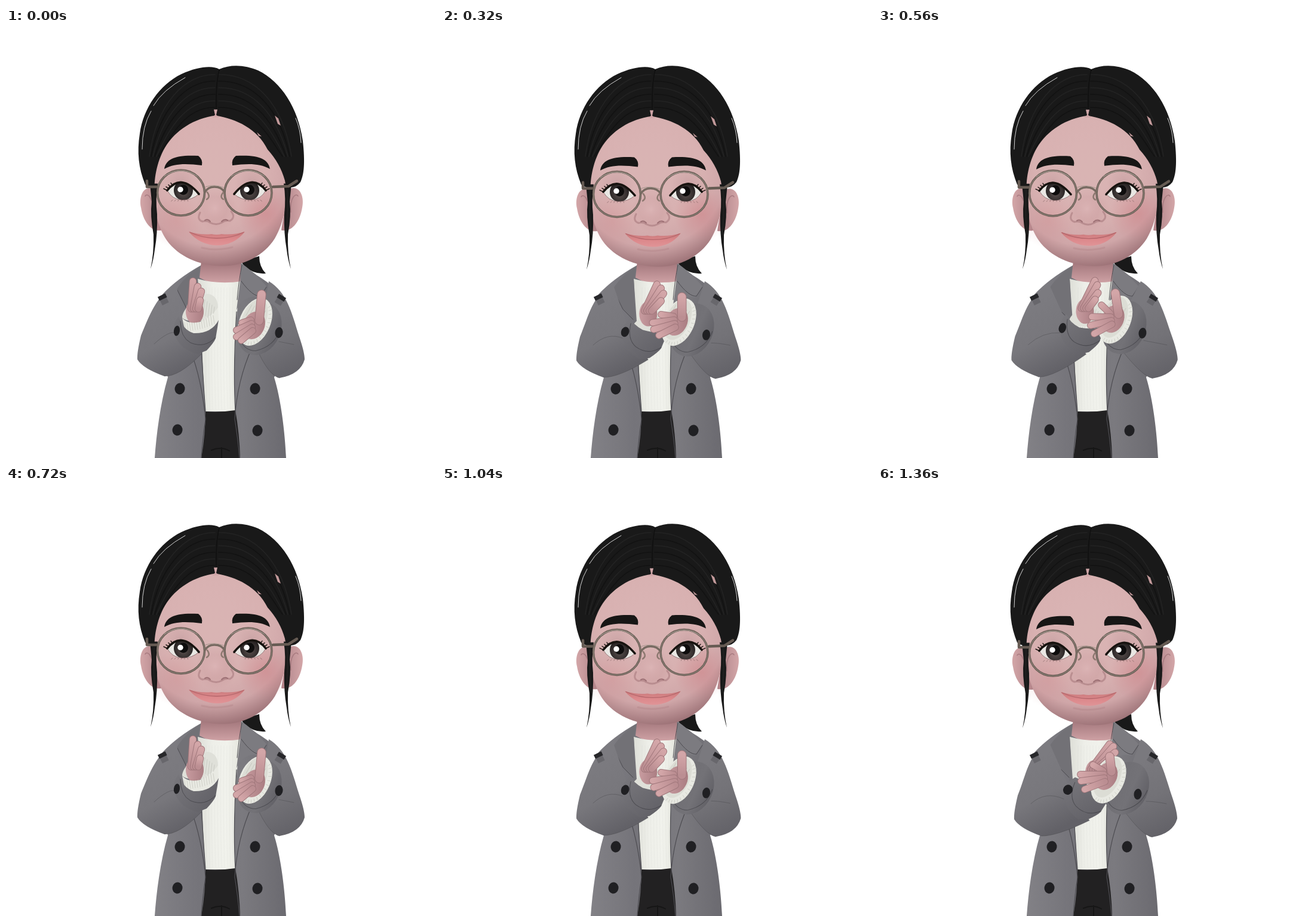
Recreate the animation shown at these times as an HTML page with a canvas. Size 720x720 px, loop 1440 ms.

```html
<!DOCTYPE html>
<html lang="en">
<head>
<meta charset="utf-8">
<title>Clapping avatar</title>
<style>
html, body { margin: 0; width: 100%; height: 100%; overflow: hidden; background: #fff; }
canvas { display: block; width: 100vw; height: 100vh; }
</style>
</head>
<body>
<canvas id="stage" width="720" height="720"></canvas>
<script>
const ctx = document.getElementById('stage').getContext('2d');
const LOOP = 1440, STEP = 80, CLAP = 360;
const BLACK = '#191919', SEAM = '#4d4c51', KNIT = '#eeefe9';

// Key poses of one clap: half open, open, closing, near, together.
const KEY_TIMES = [0, 40, 120, 160, 280];
const NOD = [[1], [0], [1], [0], [5]];
// elbow, cuff, cuff angle, palm, four fingertips
const LEFT = [
  [220, 552, 319, 513, 0, 316, 475, 313, 424, 321, 433, 327, 441, 325, 456],
  [215, 550, 282, 504, 0, 279, 470, 263, 420, 272, 425, 283, 434, 286, 445],
  [215, 550, 286, 500, -.05, 287, 463, 267, 409, 276, 411, 281, 422, 286, 440],
  [220, 552, 329, 505, 0, 329, 470, 335, 417, 339, 425, 340, 439, 337, 452],
  [228, 555, 346, 527, .4, 362, 480, 388, 432, 394, 436, 397, 446, 392, 456]
];
// elbow, cuff, cuff angle, knit centre, button, palm, thumb tip, four fingertips
const RIGHT = [
  [500, 553, 424, 503, .4, 417, 492, 457, 510, 415, 498, 428, 446, 395, 494, 386, 506, 386, 517, 394, 523],
  [501, 552, 448, 498, .5, 450, 490, 480, 507, 455, 492, 472, 448, 485, 492, 460, 508, 448, 514, 436, 524],
  [502, 553, 442, 494, .7, 440, 483, 475, 501, 447, 486, 471, 453, 458, 476, 445, 490, 432, 500, 422, 510],
  [502, 553, 415, 498, .4, 410, 486, 452, 507, 408, 488, 414, 441, 394, 466, 381, 486, 376, 501, 380, 514],
  [501, 555, 416, 506, .45, 386, 492, 435, 516, 382, 486, 388, 453, 360, 467, 339, 483, 340, 494, 346, 508]
];

const at = (list, i) => list[(i + 5) % 5];
const keyTime = i => at(KEY_TIMES, i) + CLAP * Math.floor(i / 5);

// Periodic cubic interpolation through the key poses.
function pose(keys, phase) {
  let i = 4;
  while (KEY_TIMES[i] > phase) i--;
  const [a, b, c, d] = [-1, 0, 1, 2].map(n => keyTime(i + n));
  const span = c - b, u = (phase - b) / span;
  return at(keys, i).map((p, n) => {
    const q = at(keys, i + 1)[n];
    const m = (q - at(keys, i - 1)[n]) / (c - a) * span;
    const k = (at(keys, i + 2)[n] - p) / (d - b) * span;
    return p + u * (m + u * (3 * (q - p) - 2 * m - k + u * (2 * (p - q) + m + k)));
  });
}

const fill = (d, color) => { ctx.fillStyle = color; ctx.fill(new Path2D(d)); };
function line(d, color, width = 1) {
  ctx.strokeStyle = color;
  ctx.lineWidth = width;
  ctx.stroke(new Path2D(d));
}
function oval(x, y, rx, ry, color, angle = 0) {
  ctx.beginPath();
  ctx.ellipse(x, y, rx, ry, angle, 0, 7);
  ctx.fillStyle = color;
  ctx.fill();
}
function addStops(g, colors) {
  colors.forEach((c, i) => g.addColorStop(i / (colors.length - 1), c));
  return g;
}
const linear = (x0, y0, x1, y1, ...colors) => addStops(ctx.createLinearGradient(x0, y0, x1, y1), colors);
const radial = (x, y, r, ...colors) => addStops(ctx.createRadialGradient(x, y, 0, x, y, r), colors);
const glow = (x, y, r, rgb, alpha) => oval(x, y, r, r, radial(x, y, r, `rgba(${rgb},${alpha})`, `rgba(${rgb},0)`));
function placed(x, y, angle, draw) {
  ctx.save();
  ctx.translate(x, y);
  ctx.rotate(angle);
  draw();
  ctx.restore();
}
function mirrored(axis, draw) {
  draw();
  ctx.save();
  ctx.translate(2 * axis, 0);
  ctx.scale(-1, 1);
  draw();
  ctx.restore();
}

function finger(x0, y0, x1, y1, width) {
  const d = `M${x0} ${y0}L${x1} ${y1}`;
  line(d, '#a0777b', width + 1.5);
  line(d, linear(x0, y0, x1, y1, '#bb8e92', '#d3a6a8'), width - .5);
}
const palm = (x, y, rx, ry, angle) => oval(x, y, rx, ry, linear(x - rx, y, x + rx, y, '#c89ca0', '#ab7e83'), angle);
const button = (x, y, rx = 8.5, ry = 9.5) => oval(x, y, rx, ry, '#202023', .15);

function drawBody() {
  fill('M394 391L424 382Q424 400 435 411Q415 413 398 398Z', BLACK);
  fill('M327 397Q286 420 262 446L256 520L271 585C258 630 252 680 249 720H469C467 675 460 620 449 585L484 510L470 460Q455 435 420 414L394 394Z',
    linear(249, 0, 469, 0, '#828186', '#75747a', '#7b7a7f', '#6b6a70'));
  fill('M328 380L324 418Q358 438 396 424L392 380Z', linear(0, 392, 0, 428, '#a2767b', '#d0a3a6'));
  fill('M321 420Q356 430 395 424Q386 465 384 520Q381 585 384 642H334Q329 575 328 520Z',
    linear(322, 0, 394, 0, '#dedfd8', KNIT, '#f1f2ec', '#e3e4dc'));
  for (let x = 335; x < 382; x += 5) line(`M${x} 435Q${x - 2} 540 ${x + 1} 638`, 'rgba(140,140,130,.06)');
  fill('M334 642Q358 644 384 640Q391 680 392 720H327Q334 680 334 642Z', '#222122');
  line('M344 707Q360 700 374 708M361 703V720', '#161616', 2);

  fill('M326 398Q300 415 286 437L303 471L320 490L326 520L321 420Z', '#727176');
  line('M286 437L303 471L320 488', SEAM);
  fill('M394 394Q412 406 436 432L424 451Q398 445 386 472L392 425Z', '#7c7b80');
  line('M395 397Q390 421 387 455M394 424Q413 450 426 449L436 434', SEAM);
  line('M309 540Q328 590 334 655Q329 690 327 720M412 535Q387 590 383 655Q388 685 391 720M334 642Q329 575 325 500M384 642Q380 570 386 475', SEAM, 1.2);
  button(291, 604); button(417, 604); button(287, 673); button(421, 674);
}

function shoulderTab(x, y, angle) {
  placed(x, y, angle, () => {
    ctx.fillStyle = '#68676c';
    ctx.fillRect(-6, 3, 12, 9);
    ctx.fillStyle = '#27272a';
    ctx.fillRect(-7, -4, 14, 7);
  });
}

function drawLeftArm([ex, ey, cx, cy, angle, px, py, ...tips]) {
  const tuck = 60 * Math.max(0, angle);
  fill(`M286 428C252 446 ${ex + 20} ${ey - 70} ${ex + 6} ${ey - 37}Q${ex - 1} ${ey - 8} ${ex} ${ey + 3}Q${ex + 9} ${ey + 18} ${ex + 45} ${ey + 31}
    Q${ex + 70} ${ey + 32} ${cx + 8} ${cy + 33}L${cx - 28} ${cy - 27}Z`, linear(235, 470, 292, 580, '#7c7b80', '#78777c', '#626167'));
  line(`M${ex + 28} ${ey - 23}Q${ex + 52} ${ey - 45} ${cx - 35} ${cy - 3}M${ex + 45} ${ey + 31}Q${ex + 70} ${ey + 32} ${cx + 8} ${cy + 33}`, 'rgba(60,60,65,.35)');
  shoulderTab(262, 451, -.45);
  placed(cx, cy, angle, () => {
    ctx.translate(0, tuck);
    fill('M-24-28C-15-18 20-20 36-45C36-66 20-72 8-65C-5-60-24-40-24-28Z', '#dfe0d9');
    for (let i = 0; i < 6; i++) line(`M${10 + i * 4} ${-61 + i * 3}l-3 24`, '#c5c6be', .8);
  });
  palm(px, py, 15, 21);
  for (let i = 0; i < 4; i++) finger(px - 6 + 4 * i, py - 5, tips[2 * i], tips[2 * i + 1], 11);
  placed(cx, cy, angle, () => {
    ctx.save();
    ctx.translate(0, tuck);
    fill('M-24-28C-15-14 20-16 36-45L37-24C25 0-5 2-19-4Z', '#e9eae3');
    for (let i = 0; i < 13; i++) line(`M${-20 + i * 4} ${-20 - i * i * .08}l2 14`, 'rgba(130,130,120,.25)');
    ctx.restore();
    fill(`M-30-30Q-39-18-38-8Q-37 8-22 22Q-8 31 2 33L17 27Q29 14 32 7L37-24Q25 ${-1 - tuck}-5 ${-2 - tuck}Q-22 ${-7 - tuck}-30-30Z`,
      linear(-34, -20, 25, 25, '#76757a', '#626167'));
    line('M-27-22Q-27 5-10 14Q14 24 32 5', 'rgba(50,50,55,.55)');
    button(-33, -6, 5 + 7 * Math.max(0, angle), 8.5);
  });
}

function drawRightArm([ex, ey, cx, cy, angle, wx, wy, bx, by, px, py, tx, ty, ...tips]) {
  fill(`M440 424C470 442 478 475 ${ex - 9} ${ey - 36}Q${ex} ${ey - 10} ${ex} ${ey + 2}Q${ex - 7} ${ey + 27} ${ex - 42} ${ey + 33}
    Q${ex - 58} ${ey + 30} ${cx} ${cy + 43}L${cx + 10} ${cy - 43}Z`, linear(425, 470, 480, 585, '#7a797e', '#737277', '#626167'));
  line(`M${ex - 42} ${ey + 33}Q${ex - 58} ${ey + 30} ${cx} ${cy + 43}M${ex - 18} ${ey - 23}Q${ex - 38} ${ey - 27} ${cx + 33} ${cy + 22}`, 'rgba(60,60,65,.35)');
  shoulderTab(461, 452, .55);
  oval(cx, cy, 36, 46, linear(cx - 30, cy, cx + 36, cy + 30, '#6f6e73', '#737277', '#5d5c62'), angle);
  placed(cx, cy, angle, () => line('M33-12Q35 18 9 37Q-8 44-24 29', 'rgba(50,50,55,.55)'));
  button(bx, by, 6.5, 9);
  oval(wx, wy, 26, 42, '#e8e9e2', angle);
  placed(wx, wy, angle, () => {
    for (let i = 0; i < 15; i++) {
      const a = -1 + i * .2, c = Math.cos(a), s = Math.sin(a);
      line(`M${20 * c} ${36 * s}L${25 * c} ${41 * s}`, '#cbccc4', .8);
    }
    oval(-3, -3, 20, 36, '#dcddd5');
    for (let i = 0; i < 6; i++) line(`M${-16 + i * 5} -24l-2 20`, '#c3c4bc', .8);
  });
  palm(px, py, 18, 24, angle);
  finger(px + 9, py - 8, tx, ty, 14);
  for (let i = 0; i < 4; i++) finger(px - 5 + i, py - 9 + 6 * i, tips[2 * i], tips[2 * i + 1], 10.5);
}

function drawHair() {
  fill('M357 69C377 60 401 62 422 71C461 90 489 134 497 189C501 226 499 246 493 258Q482 272 466 264H254Q242 270 233 262C222 235 219 208 224 177C230 134 257 95 294 77C320 65 345 62 357 69Z', BLACK);
  for (let i = 0; i < 6; i++) {
    const y = 78 + i * 11, tone = i % 2 ? '#121212' : '#232323';
    line(`M350 ${y}C300 ${y - 1} ${252 + i * 5} ${y + 48} ${240 + i * 3} 215`, tone, 1.6);
    line(`M356 ${y}C416 ${y - 1} ${464 - i * 5} ${y + 48} ${478 - i * 3} 215`, tone, 1.6);
  }
  line('M357 70Q351 95 352 136', '#101010', 1.5);
  line('M247 130Q262 104 300 83M228 203Q228 164 243 139M485 151Q493 170 494 192', '#fff', .8);
}

function drawFace() {
  mirrored(361, () => {
    fill('M250 270C230 260 222 282 226 300C230 325 244 342 261 338Z', linear(226, 0, 258, 0, '#d2a5a7', '#b1858a'));
    line('M233 281C236 275 247 282 245 308', '#a87b80', 1.5);
  });
  fill('M351 146C315 151 284 170 266 200C252 224 247 255 249 278C249 318 259 342 273 360C295 386 330 398 362 398C400 398 432 380 450 352C466 325 473 285 467 255Q459 226 438 203C421 168 386 152 351 146Z',
    radial(348, 235, 172, '#d9b4b3', '#d9b3b3', '#d8b1b1', '#cfa6a8', '#94696e'));
  glow(285, 322, 46, '205,125,130', .25);
  glow(434, 310, 46, '205,115,122', .4);
  fill('M348 136H354L352 145L357 149H345L350 145Z', '#cfa5a7');
  fill('M450 146L456 151L460 163L455 160Z', '#c39a9b');
  fill('M420 174L428 181L423 180Z', '#c39a9b');
  mirrored(359.5, () => {
    fill('M241 260H254Q250 285 253 311Q254 343 249 371Q247 388 242 403Q248 376 247 345Q241 313 244 290Z', BLACK);
    line('M248 270Q246 310 250 345', '#2b2b2b', .8);
  });
}

function drawEye(center, dir, blink) {
  const x = v => center + dir * v;
  const h = 271 + 7 * blink, lid = 241 + 32 * blink;
  const upper = `M${x(-25)} ${h}Q${x(-2)} ${lid} ${x(28)} 277`;
  const shape = `${upper}Q${x(17)} 287 ${x(0)} 287Q${x(-17)} 286 ${x(-25)} ${h}Z`;
  const iris = center + 2 * dir;
  glow(x(-2), 258, 29, '150,110,116', .2 + .2 * blink);
  ctx.save();
  ctx.clip(new Path2D(shape));
  ctx.fillStyle = '#e9e7e3';
  ctx.fillRect(center - 32, 245, 64, 48);
  oval(iris, 271, 16, 16.5, radial(iris, 275, 18, '#5a504e', '#403938', '#242020'));
  oval(iris, 270, 8, 8.5, '#0e0d0d');
  oval(iris - 5, 269.5, 4.7, 4.7, '#fff');
  ctx.restore();
  line(shape, 'rgba(110,75,78,.65)', 1);
  line(upper, '#17130f', 3.6 - blink);
  for (let i = 0; i < 4; i++) {
    const bx = -25 + i * 3, by = h - i * 2.8 * (1 - blink);
    line(`M${x(bx)} ${by}l${-dir * (6 - i)} ${-3 - i * .4 + 7 * blink}`, '#17130f', 1.4);
  }
  for (let i = 0; i < 6; i++) line(`M${x(-16 + i * 5)} 287l${dir * (i - 4) * .6} 2`, 'rgba(50,30,30,.5)', .7);
}

function drawFeatures(blink) {
  ctx.save();
  ctx.translate(0, 11 * blink - 2);
  mirrored(353.5, () => fill(`M${265 + 5 * blink} ${237 - 4 * blink}C268 219 286 213 322 215Q330 221 328 231C303 228 283 227 265 ${237 - 4 * blink}Z`, '#171615'));
  ctx.restore();

  glow(352, 304, 36, '178,120,126', .3);
  glow(350, 301, 20, '228,192,192', .6);
  line('M325 308Q319 320 329 323Q337 321 342 325Q352 330 361 325Q368 320 375 322Q385 316 377 306', 'rgba(145,99,104,.4)', 3);
  line('M333 321Q338 318 342 323M361 323Q366 318 371 321', 'rgba(145,99,104,.75)', 2);

  fill('M306 340Q327 346 344 344Q353 346 361 344Q380 346 400 340Q382 363 353 363Q324 362 306 340Z', linear(0, 341, 0, 363, '#c8797b', '#dc888b', '#e09497'));
  line('M308 341Q329 351 353 351Q379 351 398 341', '#b4666b', 1.3);
  line('M328 367Q352 373 379 366', 'rgba(155,106,110,.2)', 3);

  drawEye(295, 1, blink);
  drawEye(410, -1, blink);
  drawGlasses();
}

function drawGlasses() {
  for (const x of [293, 405.5]) {
    const ring = `M${x - 39.5} 275a39.5 38 0 1 0 79 0a39.5 38 0 1 0-79 0`;
    line(ring, '#665b53', 3.5);
    line(ring, '#92857b', 1.1);
    line(`M${x - 28} 247Q${x} 229 ${x + 27} 247`, '#b5aaa1', .8);
  }
  line('M333 274Q338 265 349 265Q361 265 366 274', '#776a61', 3.5);
  line('M334 265Q349 260 364 266', '#a1948a', 1);
  line('M337 274Q343 282 336 286M364 274Q357 282 364 286', '#8d7870', 2.5);
  line('M252 265H236V255M447 265L473 264L487 255', '#665b53', 4.5);
}

function draw(now) {
  const time = Math.floor(now % LOOP / STEP) * STEP;
  const phase = time % CLAP;
  const blink = Math.max(0, 1 - Math.abs(time - 1200) / 140);
  const [nod] = pose(NOD, phase);

  ctx.lineCap = ctx.lineJoin = 'round';
  ctx.fillStyle = '#fff';
  ctx.fillRect(0, 0, 720, 720);
  drawBody();
  drawHair();
  ctx.save();
  ctx.translate(0, nod * .5);
  drawFace();
  ctx.translate(0, nod * .5);
  drawFeatures(blink);
  ctx.restore();
  drawLeftArm(pose(LEFT, phase));
  drawRightArm(pose(RIGHT, phase));
  requestAnimationFrame(draw);
}
requestAnimationFrame(draw);
</script>
</body>
</html>
```
